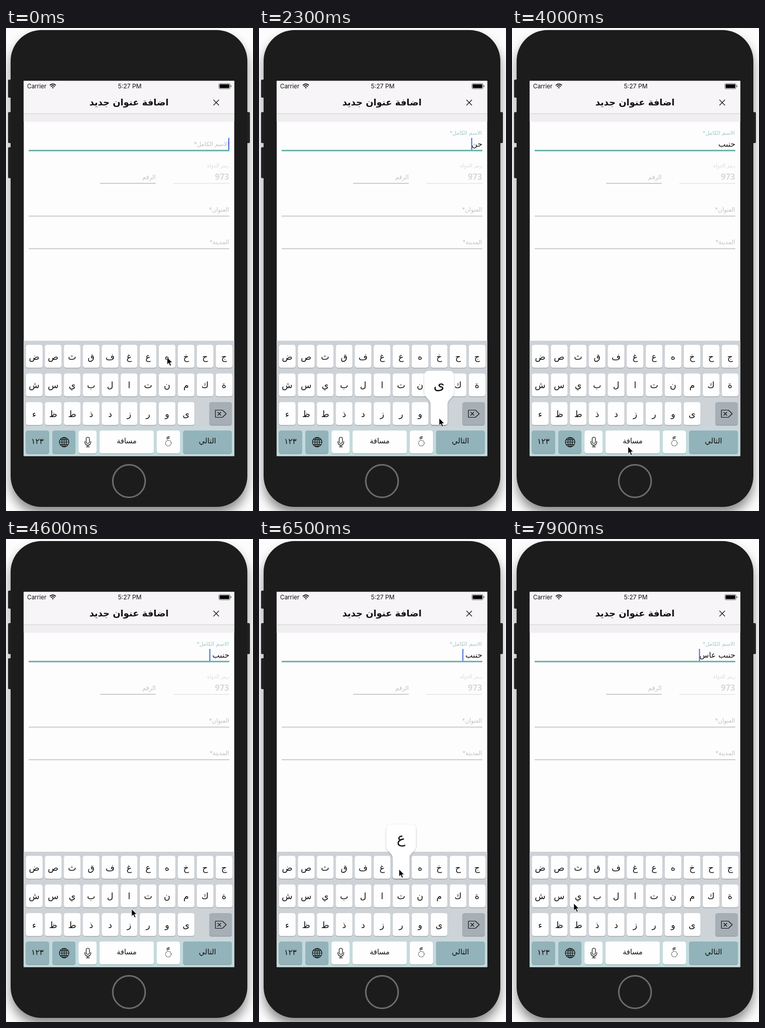
An HTML page that plays this animation: 480x936 px, repeating every 8000 ms.

```html
<!DOCTYPE html>
<html lang="ar">
<head>
<meta charset="utf-8">
<title>اضافة عنوان جديد</title>
<style>
  html, body { margin: 0; width: 100%; height: 100%; overflow: hidden; background: #fdfcfd; }
  svg { display: block; width: 480px; height: 936px; }
  text { font-family: "DejaVu Sans", sans-serif; fill: #111; white-space: pre; }
  .rtl { direction: rtl; }
  .mid { text-anchor: middle; }
  .status { font-family: Inter, sans-serif; }
  .hint { font-size: 11.5px; fill: #c0c0c3; }
  .line { fill: none; stroke: #111; stroke-width: 1.2; stroke-linecap: round; stroke-linejoin: round; }
</style>
</head>
<body>
<svg viewBox="0 0 480 936">
  <defs>
    <filter id="phoneShadow" x="-20%" y="-10%" width="140%" height="120%">
      <feDropShadow dx="0" dy="13" stdDeviation="10" flood-opacity=".45"/>
    </filter>
    <filter id="bubbleShadow" x="-30%" y="-20%" width="160%" height="140%">
      <feDropShadow dx="0" dy="1" stdDeviation="1.6" flood-opacity=".3"/>
    </filter>
    <linearGradient id="board" x1="0" y1="0" x2="0" y2="1">
      <stop offset="0" stop-color="#ced2d7"/>
      <stop offset=".7" stop-color="#ced3d7"/>
      <stop offset=".82" stop-color="#c4dadd"/>
      <stop offset="1" stop-color="#c0dcde"/>
    </linearGradient>
    <clipPath id="screen"><rect x="34.5" y="102.5" width="409" height="727"/></clipPath>
  </defs>

  <g fill="#2a282b">
    <rect x="4" y="100" width="8" height="35" rx="2"/>
    <rect x="4" y="163" width="8" height="60" rx="2"/>
    <rect x="4" y="231" width="8" height="60" rx="2"/>
    <rect x="466" y="163" width="8" height="60" rx="2"/>
  </g>
  <rect x="9" y="4" width="460" height="924" rx="60" fill="#1c1a1d" filter="url(#phoneShadow)"/>
  <circle cx="239" cy="878" r="31.5" fill="none" stroke="#6c6b6d" stroke-width="3"/>

  <g clip-path="url(#screen)">
    <rect x="34" y="102" width="410" height="728" fill="#fefdfe"/>
    <rect x="34" y="102" width="410" height="64" fill="#f7f5f7"/>
    <rect x="34" y="166" width="410" height="15.5" fill="#f0eef0"/>
    <rect x="34" y="165.5" width="410" height="1" fill="#d0ced0"/>

    <text class="status" x="41" y="117" font-size="11.5">Carrier</text>
    <text class="status mid" x="240.5" y="117" font-size="11.8">5:27 PM</text>
    <g fill="none" stroke="#111" stroke-width="1.7">
      <path d="M85 111.2Q91 105.8 97 111.2M87.2 113.6Q91 110.2 94.8 113.6"/>
      <path d="M89.2 115.2Q91 113.6 92.8 115.2L91 117.2Z" fill="#111" stroke="none"/>
    </g>
    <rect x="413.5" y="107.5" width="22" height="10.5" rx="2.5" fill="none" stroke="#555" stroke-width=".8"/>
    <rect x="415" y="109" width="19" height="7.5" rx="1.2"/>
    <rect x="436.5" y="111" width="1.5" height="3.5" rx=".7" fill="#555"/>

    <text class="rtl mid" x="239" y="150" font-size="17.5" font-weight="bold">اضافة عنوان جديد</text>
    <path class="line" d="M403.5 139.5l10 10m0-10l-10 10"/>

    <text id="nameLabel" class="rtl hint" x="433">الاسم الكامل*</text>
    <text id="nameValue" class="rtl" x="434" y="230" font-size="15"></text>
    <rect x="44" y="236" width="390" height="3" fill="#70b5ae"/>
    <rect id="caret" y="213" width="2" height="23" fill="#4a6fd8"/>

    <text class="rtl" x="433.5" y="270" font-size="10" style="fill:#d9d9dc">رمز الدولة</text>
    <text x="433.5" y="294" font-size="16" font-weight="bold" text-anchor="end"
          style="fill:#d8d8db;font-family:'Noto Sans',sans-serif">973</text>
    <rect x="325" y="300.5" width="109" height="1.2" fill="#d9e3e4"/>
    <text class="rtl hint" x="291" y="293">الرقم</text>
    <rect x="183" y="300.3" width="108" height="1.4" fill="#b9b9bb"/>
    <text class="rtl hint" x="433.5" y="356">العنوان*</text>
    <rect x="44" y="363.8" width="390" height="1.4" fill="#b9b9bb"/>
    <text class="rtl hint" x="433.5" y="419">المدينة*</text>
    <rect x="44" y="427" width="390" height="1.4" fill="#b9b9bb"/>

    <rect x="34" y="606" width="410" height="224" fill="url(#board)"/>
    <g id="keys"></g>

    <text class="mid" x="61" y="806" font-size="15">١٢٣</text>
    <g class="line">
      <circle cx="113" cy="802.5" r="9.2"/>
      <ellipse cx="113" cy="802.5" rx="4.4" ry="9.2"/>
      <path d="M113 793.3v18.4M103.8 802.5h18.4M105.5 797.8h15M105.5 807.2h15"/>
      <rect x="155.8" y="793" width="6.4" height="12" rx="3.2"/>
      <path d="M153.3 801v2a5.7 5.7 0 0 0 11.4 0v-2M159 808.7v3M156 811.7h6"/>
      <circle cx="315.5" cy="804.5" r="5.5" stroke-dasharray=".6 2.3"/>
      <path d="M312.5 793.6l5-2M312.5 796.4l5-2"/>
      <path d="M407 740.5h13.5l7.5 7-7.5 7h-13.5zM411.5 744.5l6 6m0-6l-6 6"/>
    </g>
    <text class="rtl mid" x="234.5" y="805" font-size="14">مسافة</text>
    <text class="rtl mid" x="391.5" y="805" font-size="14.5">التالي</text>

    <g id="bubble" filter="url(#bubbleShadow)">
      <path fill="#fff" d="M-12.5-51q0-10 10-10h37.5q10 0 10 10v30c0 14-12.5 14-12.5 26v34q0 5-5 5h-22.5q-5 0-5-5v-34c0-12-12.5-12-12.5-26z"/>
      <text id="bubbleLetter" class="mid" x="16.2" y="-25" font-size="28"></text>
    </g>
  </g>

  <path id="pointer" d="M0 0V14.2L3.3 11.2 5.7 16.8 8.2 15.7 5.8 10.3H10.2Z"
        fill="#000" stroke="#fff" stroke-width=".9" stroke-linejoin="round"/>
</svg>
<script>
const LOOP = 8000;
const PITCH = 36.9, KEY_W = 32.5, KEY_H = 44.5, LEFT = 38.5;
const ROWS = [[614, 'ضصثقفغعهخحج'], [669.5, 'شسيبلاتنمكة'], [725, 'ءظطذدزروى']];

// Letter, key down, key up; the letter is entered on release.
const PRESSES = [
  ['ح', 780, 890], ['ن', 1360, 1490], ['ى', 2240, 2390], ['ب', 3160, 3260],
  ['\u00a0', 4050, 4150], ['ع', 6430, 6580], ['ا', 7130, 7240], ['س', 7660, 7780]
];

// Time, x, y of the pointer tip.
const PATH = [
  [0, 313, 638], [100, 313, 638], [300, 314, 650], [500, 314, 650], [780, 388, 644], [890, 387, 645],
  [1200, 337, 698], [1380, 319, 698], [1500, 316, 702], [1900, 211, 754], [2200, 346, 756], [2300, 350, 756],
  [2400, 349, 756], [2900, 225, 712], [3100, 202, 702], [3190, 180, 702], [3300, 203, 702],
  [3700, 215, 828], [4050, 226, 810], [4150, 222, 809], [4350, 129, 745], [4600, 244, 717],
  [4900, 386, 700], [5150, 409, 730], [5500, 250, 807], [5800, 118, 700], [5900, 117, 690],
  [6150, 200, 784], [6320, 400, 700], [6460, 272, 640], [6560, 272, 640], [6750, 330, 690],
  [6950, 300, 784], [7130, 241, 702], [7240, 240, 702], [7500, 140, 704], [7670, 105, 702],
  [7770, 105, 703], [7900, 120, 706], [8000, 120, 706]
];

const $ = id => document.getElementById(id);
const keys = {};

function add(tag, attrs) {
  const el = document.createElementNS('http://www.w3.org/2000/svg', tag);
  for (const name in attrs) el.setAttribute(name, attrs[name]);
  return $('keys').appendChild(el);
}

function addKey(x, y, width, fill = '#fefefe') {
  const shape = { x, y, width, height: KEY_H, rx: 4.5 };
  add('rect', { ...shape, y: y + 1, fill: '#8b9298' });
  return add('rect', { ...shape, fill });
}

for (const [y, letters] of ROWS) {
  [...letters].forEach((letter, i) => {
    const x = LEFT + i * PITCH;
    addKey(x, y, KEY_W);
    add('text', { x: x + KEY_W / 2, y: y + 28.5, class: 'mid', 'font-size': 17 }).textContent = letter;
    keys[letter] = { x, y };
  });
}
addKey(395, 725, 44, '#a6aeb6');
addKey(38.5, 780, 45.5, '#94b2b9');
addKey(90, 780, 45, '#92b3ba');
addKey(141, 780, 35, '#fefefe');
const spaceKey = addKey(181.5, 780, 106);
addKey(293, 780, 45);
addKey(344, 780, 95, '#92b3ba');

const clamp = v => Math.min(1, Math.max(0, v));
const smooth = v => v * v * (3 - 2 * v);
const mix = (a, b, p) => a + (b - a) * p;

function pointerAt(t) {
  const i = Math.max(1, PATH.findIndex(step => step[0] > t));
  const [t0, x0, y0] = PATH[i - 1], [t1, x1, y1] = PATH[i];
  const p = smooth((t - t0) / (t1 - t0));
  return [mix(x0, x1, p), mix(y0, y1, p)];
}

function caretOpacity(idle) {
  const phase = idle % 1000;
  return phase < 650 ? 1 - clamp((phase - 520) / 60) : clamp((phase - 740) / 50);
}

function draw(t) {
  const entered = PRESSES.filter(press => press[2] <= t);
  const active = PRESSES.find(press => press[1] <= t && t < press[2]);
  const value = entered.map(press => press[0]).join('');
  if ($('nameValue').textContent !== value) $('nameValue').textContent = value;

  const width = value ? $('nameValue').getComputedTextLength() : 0;
  $('caret').setAttribute('x', 432 - Math.max(0, width - 1));
  const lastInput = entered.length ? entered[entered.length - 1][2] : -380;
  $('caret').setAttribute('opacity', caretOpacity(t - lastInput));

  const lift = smooth(clamp((t - PRESSES[0][2]) / 150));
  const label = $('nameLabel');
  label.setAttribute('y', mix(229, 206.5, lift));
  label.style.fontSize = mix(11.5, 10.6, lift) + 'px';
  label.style.fill = `rgb(${mix(192, 158, lift)},${mix(192, 200, lift)},${mix(195, 200, lift)})`;

  const key = active && keys[active[0]];
  $('bubble').style.display = key ? '' : 'none';
  if (key) {
    $('bubble').setAttribute('transform', `translate(${key.x} ${key.y})`);
    $('bubbleLetter').textContent = active[0];
  }
  spaceKey.setAttribute('fill', active && !key ? '#a6aeb6' : '#fefefe');
  $('pointer').setAttribute('transform', `translate(${pointerAt(t)})`);
}

const start = performance.now();
function tick() {
  draw((performance.now() - start) % LOOP);
  requestAnimationFrame(tick);
}
tick();
</script>
</body>
</html>
```
